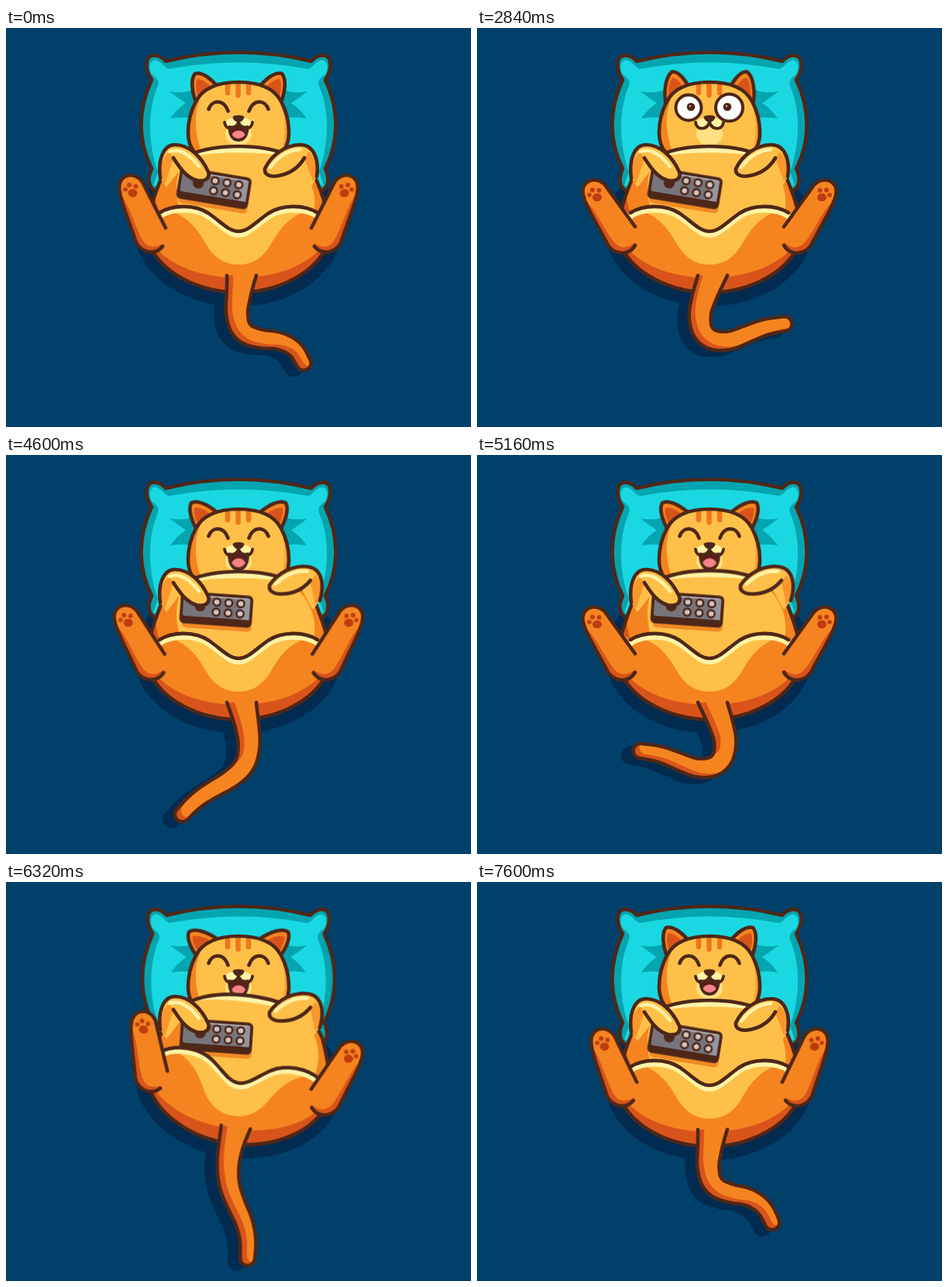
Write an HTML page that moves like this. It is 600x516 px and loops after 7.64 s.

```html
<!DOCTYPE html>
<html lang="en">
<head>
<meta charset="utf-8">
<title>Laughing cat</title>
<style>
  html, body { margin: 0; width: 100%; height: 100%; overflow: hidden; background: #00406a; }
  svg { display: block; width: 100%; height: 100%; }

  .line { fill: none; stroke: #4e2718; stroke-width: 4.6; stroke-linecap: round; stroke-linejoin: round; }
  .ink { fill: #4e2718; }
  .shadow { fill: #012b50; }
  .teal { fill: #04a5b0; }
  .aqua { fill: #1ad8e1; }
  .light { fill: #ffc04a; }
  .amber { fill: #f9972c; }
  .orange { fill: #f58420; }
  .rust { fill: #d9541a; }
  .cream { fill: #fff3a6; }
  .gloss { fill: none; stroke: #fff3a6; stroke-width: 4.5; stroke-linecap: round; }
  .pads { fill: #bf3c10; }

  .pillow, .body, .thighs, .belly, .leg, .ear, .remote, .lift, .rest, .raised, .awake, .happy, .laugh, .pupils {
    animation: 7640ms ease-in-out infinite;
  }
  .pillow { transform-origin: 300px 120px; animation-name: pillow; }
  .body { transform-origin: 300px 255px; animation-name: sway; }
  .thighs { transform-origin: 300px 255px; animation-name: thighs; }
  .belly { transform-origin: 300px 342px; animation-name: swell; }
  .leg { transform-origin: 195px 270px; }
  .leg.a { animation-name: kick-a; }
  .leg.b { animation-name: kick-b; }
  .ear { transform-origin: 257px 86px; animation-name: ear; }
  .remote { transform-origin: 245px 195px; animation-name: remote; }
  .lift { animation-name: lift; }
  .rest { transform-origin: 398px 185px; animation-name: rest; }
  .raised { transform-origin: 386px 190px; animation-name: raised; }
  .awake { transform-origin: 300px 103px; animation-name: awake; }
  .happy { animation-name: happy; animation-timing-function: step-end; }
  .laugh { transform-origin: 300px 126px; animation-name: laugh; }
  .pupils { animation-name: look; }

  @keyframes pillow {
    0%, 76%, 99%, 100% { transform: none; }
    81%, 93% { transform: scaleX(.988); }
  }
  @keyframes sway {
    0%, 77.5%, 99%, 100% { transform: translate(0, 0) rotate(0); }
    81.7%, 83.5% { transform: translate(1px, -3px) rotate(7.5deg); }
    88.8%, 91.5% { transform: translate(0, 0) rotate(-6deg); }
  }
  @keyframes thighs {
    0%, 77.5%, 99%, 100% { transform: translate(0, 0) rotate(0); }
    81.7%, 83.5% { transform: rotate(3deg); }
    88.8%, 91.5% { transform: translate(0, -3px) rotate(-1deg); }
  }
  @keyframes swell {
    0%, 51.5%, 98.5%, 100% { transform: none; }
    57%, 62%, 67%, 72%, 78%, 93% { transform: scaleY(1.02); }
    59.5%, 64.5%, 69.5%, 75% { transform: scaleY(1.01); }
  }
  @keyframes kick-a {
    0% { transform: rotate(9deg); }
    10.4%, 47.2%, 51.8% { transform: rotate(0); }
    56% { transform: rotate(-5deg); }
    61.5% { transform: rotate(4deg); }
    67.5%, 77.5% { transform: rotate(0); }
    72.5% { transform: rotate(-3deg); }
    81.7%, 83.5% { transform: rotate(15deg); }
    88.8%, 91.5% { transform: rotate(-16deg); }
    99%, 99.5% { transform: rotate(10deg); }
    100% { transform: rotate(9deg); }
  }
  @keyframes kick-b {
    0% { transform: rotate(9deg); }
    10.4%, 47.2%, 51.8% { transform: rotate(0); }
    56% { transform: rotate(-5deg); }
    61.5% { transform: rotate(4deg); }
    67.5%, 77.5% { transform: rotate(0); }
    72.5% { transform: rotate(-3deg); }
    81.7%, 83.5% { transform: rotate(9deg); }
    88.8%, 91.5% { transform: rotate(-6deg); }
    99%, 99.5% { transform: rotate(10deg); }
    100% { transform: rotate(9deg); }
  }
  @keyframes ear {
    0%, 4% { transform: none; }
    8%, 46.8% { transform: rotate(16deg); }
    50%, 53% { transform: none; }
    60%, 70% { transform: rotate(-11deg); }
    80%, 92% { transform: rotate(-19deg); }
    98.5%, 100% { transform: none; }
  }
  @keyframes remote {
    0%, 47.5% { transform: rotate(9.5deg); }
    51.8% { transform: translate(2px, 0) rotate(6.5deg); }
    58%, 92% { transform: translate(2px, -5px) rotate(4deg); }
    98.5%, 100% { transform: rotate(9.5deg); }
  }
  @keyframes lift {
    0%, 51.8% { transform: none; }
    58%, 92% { transform: translate(0, -3px); }
    98.5%, 100% { transform: none; }
  }
  @keyframes rest {
    0%, 47.5% { transform: none; opacity: 1; }
    49.8% { transform: rotate(22deg); opacity: 1; }
    49.81%, 53.79% { opacity: 0; transform: rotate(22deg); }
    53.8% { transform: rotate(20deg); opacity: 1; }
    55%, 68.5% { transform: translate(5px, -4px) rotate(9deg); opacity: 1; }
    69.6% { transform: rotate(22deg); opacity: 1; }
    69.61%, 72.99% { opacity: 0; transform: rotate(22deg); }
    73% { transform: rotate(20deg); opacity: 1; }
    74.2%, 87% { transform: translate(5px, -4px) rotate(9deg); opacity: 1; }
    88.7% { transform: rotate(22deg); opacity: 1; }
    88.71%, 92.79% { opacity: 0; transform: rotate(22deg); }
    92.8% { transform: rotate(20deg); opacity: 1; }
    95%, 97% { transform: translate(4px, -3px) rotate(7deg); opacity: 1; }
    99.4%, 100% { transform: none; opacity: 1; }
  }
  @keyframes raised {
    0%, 49.79% { opacity: 0; transform: rotate(-34deg); }
    49.8% { opacity: 1; transform: rotate(-34deg); }
    51.4%, 52.2% { opacity: 1; transform: none; }
    53.79% { opacity: 1; transform: rotate(-34deg); }
    53.8%, 69.59% { opacity: 0; transform: rotate(-34deg); }
    69.6% { opacity: 1; transform: rotate(-34deg); }
    71%, 71.6% { opacity: 1; transform: none; }
    72.99% { opacity: 1; transform: rotate(-34deg); }
    73%, 88.69% { opacity: 0; transform: rotate(-34deg); }
    88.7% { opacity: 1; transform: rotate(-34deg); }
    90.2%, 91.2% { opacity: 1; transform: translate(0, -5px) rotate(-3deg); }
    92.79% { opacity: 1; transform: rotate(-34deg); }
    92.8%, 100% { opacity: 0; transform: rotate(-34deg); }
  }
  @keyframes awake {
    0%, 6.27% { opacity: 0; transform: scaleY(.25); }
    6.28% { opacity: 1; transform: scaleY(.25); }
    8.4%, 27.5% { opacity: 1; transform: none; }
    28.5% { opacity: 1; transform: scaleY(.1); }
    30%, 47% { opacity: 1; transform: none; }
    47.9% { opacity: 1; transform: scaleY(.2); }
    47.91%, 100% { opacity: 0; transform: scaleY(.2); }
  }
  @keyframes happy {
    0% { opacity: 1; }
    6.28% { opacity: 0; }
    47.91% { opacity: 1; }
  }
  @keyframes laugh {
    0%, 51.8% { transform: none; }
    58%, 93% { transform: scale(1.04, 1.14); }
    98.5%, 100% { transform: none; }
  }
  @keyframes look {
    0%, 10.5%, 15.7%, 26.5%, 35%, 100% { transform: none; }
    12.5% { transform: translate(0, -1px); }
    31%, 33% { transform: translate(2px, 1px); }
  }
</style>
</head>
<body>
<svg viewBox="0 0 600 516">
  <defs>
    <clipPath id="tailClip"><path class="tailFill"/></clipPath>
    <path id="case" d="M206 43Q300 20 394 43C402 34 413 33 417 40C421 51 416 61 412 67C432 110 428 150 412 182C418 195 416 206 408 210H192C184 206 182 195 188 182C172 150 168 110 188 67C184 61 179 51 183 40C187 33 198 34 206 43Z"/>
    <path id="torso" d="M300 153C350 153 385 168 400 195C412 225 425 260 410 290C390 322 345 342 300 342C255 342 210 322 190 290C175 260 188 225 200 195C215 168 250 153 300 153Z"/>
    <clipPath id="torsoClip"><use href="#torso"/></clipPath>
    <path id="headShape" d="M300 70C275 70 255 76 245 95C237 110 235 122 235 135C235 150 240 158 248 166H352C360 158 365 150 365 135C365 122 363 110 355 95C345 76 325 70 300 70Z"/>
    <clipPath id="headClip"><use href="#headShape"/></clipPath>
    <path id="hipLine" d="M198 239C215 228 244 228 262 240C280 253 288 263 300 263C312 263 320 253 338 240C356 228 385 228 402 239"/>
    <path id="legShape" d="M204 257L168 207C160 192 138 193 136.500 210C136 218 141 228 147 240L166 275C173 293 195 297 204 281"/>
    <clipPath id="legClip"><use href="#legShape"/></clipPath>
    <g id="legArt">
      <use href="#legShape" class="orange"/>
      <path clip-path="url(#legClip)" class="rust" d="M134 218C152 230 162 258 177 277C185 286 194 286 206 276V300H150Z"/>
      <use href="#legShape" class="line"/>
      <g class="pads">
        <ellipse cx="155" cy="219" rx="6" ry="5.3"/>
        <circle cx="145" cy="216" r="2.8"/><circle cx="149" cy="209.500" r="3"/><circle cx="157.500" cy="210" r="2.9"/>
      </g>
    </g>
    <g id="earArt">
      <path class="orange" d="M249 104C239 86 238 66 244 59C253 56 265 66 274 77Z"/>
      <path class="rust" d="M250 96C244 82 244 69 247 66C254 66 262 73 267 79Z"/>
      <path class="line" d="M249 104C239 86 238 66 244 59C253 56 265 66 274 77"/>
    </g>
    <path id="crease" class="teal" d="M246 78Q230 86 211 82Q222 91 232 97Q220 105 212 117Q228 114 242 117Z"/>
  </defs>

  <g class="body">
    <ellipse class="shadow" cx="299" cy="259" rx="134" ry="101"/>
    <path class="shadow tailFill" stroke="#012b50" stroke-width="5" transform="translate(-13 6)"/>
  </g>

  <g class="pillow">
    <use href="#case" class="teal"/>
    <path class="aqua" d="M188 60C182 48 188 40 194 42C201 44 204 51 210 53Q300 36 390 53C396 51 399 44 406 42C412 40 418 48 412 60C400 68 403 72 406 80C418 112 416 152 404 186L410 204H190L196 186C184 152 182 112 194 80C197 72 200 68 188 60Z"/>
    <use href="#crease"/>
    <use href="#crease" transform="matrix(-1 0 0 1 600 0)"/>
    <use href="#case" class="line"/>
  </g>

  <g class="ear"><use href="#earArt"/></g>
  <g transform="matrix(-1 0 0 1 600 0)"><g class="ear"><use href="#earArt"/></g></g>
  <use href="#headShape" class="light"/>
  <g clip-path="url(#headClip)">
    <path class="orange" d="M262 70C243 96 238 128 256 170H225V70Z"/>
    <path class="orange" opacity=".55" d="M345 80C362 104 364 136 352 170H372V80Z"/>
    <path d="M286 68V84M299.500 66V87M313 68V84" stroke="#ef761d" stroke-width="6.500" stroke-linecap="round"/>
  </g>
  <use href="#headShape" class="line"/>

  <ellipse cx="300" cy="137" rx="17" ry="15" fill="#ffe183"/>
  <path class="cream" d="M284 121C286 114 314 114 316 121C316 131 304 131 300 124C296 131 284 131 284 121Z"/>
  <g class="happy">
    <g class="laugh">
      <path class="line" style="fill:#5c1d18;stroke-width:3.800" d="M288.500 128Q295 130 300 124Q305 130 311.500 128C311.500 139 307 145 300 145C293 145 288.500 139 288.500 128Z"/>
      <path fill="#f58488" d="M291.500 138C294 131 306 131 308.500 138C304 144.500 296 144.500 291.500 138Z"/>
    </g>
    <path class="line" d="M261.500 105C266 92 281 92 286.500 107.500M338.500 105C334 92 319 92 313.500 107.500"/>
  </g>
  <path class="line" style="stroke-width:3.800" d="M282 122C283 132 296 133 300 122C304 133 317 132 318 122"/>
  <path class="ink" d="M292.500 115C294 112 306 112 307.500 115C307 119 303 122 300 122C297 122 293 119 292.500 115Z"/>
  <g class="awake">
    <circle class="line" style="fill:#fff;stroke-width:4" cx="273" cy="103" r="16.500"/>
    <circle class="line" style="fill:#fff;stroke-width:4" cx="325.500" cy="103" r="17.500"/>
    <g class="pupils">
      <circle class="ink" cx="276" cy="102" r="5.300"/><circle class="ink" cx="323" cy="102" r="5.300"/>
      <circle cx="275" cy="101" r="1" fill="#fff"/><circle cx="322" cy="101" r="1" fill="#fff"/>
    </g>
  </g>

  <g class="raised">
    <path class="light" d="M365 180C367 150 375 125 392 116C405 109 418 110 422 114C425 120 415 127 410 137C404 150 402 165 401 196Z"/>
    <path class="gloss" d="M372 160C376 140 382 128 394 120"/>
    <path class="amber" d="M389 196C391 170 395 142 417 122C408 134 403 160 401 196Z"/>
    <path class="line" d="M365 180C367 150 375 125 392 116C405 109 418 110 422 114C425 120 415 127 410 137C404 150 402 165 401 196"/>
  </g>

  <g class="body">
    <g class="belly">
      <use href="#torso" class="orange"/>
      <g clip-path="url(#torsoClip)">
        <path class="rust" d="M180 230L196 178C190 206 192 222 198 240Z"/>
        <path class="light" d="M300 150C350 150 378 170 392 198C400 215 400 232 394 250L300 272L226 244C220 220 214 196 232 164C250 154 274 150 300 150Z"/>
        <path class="cream" d="M238 165C270 150 330 150 362 165C330 158 270 158 238 165Z" stroke="#fff3a6" stroke-width="3"/>
      </g>
      <use href="#torso" class="line"/>
    </g>
  </g>

  <g class="remote">
    <g transform="translate(270 203)">
      <rect x="-43" y="-12" width="90" height="38" rx="5" fill="#f08a25"/>
      <rect class="line" style="fill:#4e2718" x="-44.500" y="-18.500" width="89" height="37" rx="4"/>
      <rect x="-43" y="-17" width="86" height="28" rx="3" fill="#77747c"/>
      <path fill="#96949c" d="M26 -17H41L43 -15V11H34Z"/>
      <path d="M-40 -16H40" stroke="#aaa8ae" stroke-width="2"/>
      <circle cx="-21" cy="-3" r="7" class="ink"/>
      <g id="buttons" fill="#d3c5c4" stroke="#4e2718" stroke-width="2.600"></g>
    </g>
  </g>

  <g class="lift">
    <path class="light" d="M199 194C196 172 202 151 218 151C236 151 252 166 261 186C264 195 256 199 246 197C236 194 230 189 225 183L207 206Z"/>
    <path class="amber" d="M201 196C198 180 202 165 212 160Q214 168 216 169L205 202Z"/>
    <path class="gloss" d="M211 160C225 154 240 167 249 179"/>
    <path class="line" d="M199 194C196 172 202 151 218 151C236 151 252 166 261 186C264 195 256 199 246 197C232 193 224 180 216 168"/>
  </g>
  <g class="rest">
    <path class="light" d="M401 192C404 172 398 151 380 151C360 151 342 165 334 182C333 191 343 193 352 191C362 189 370 186 376 182L394 205Z"/>
    <path class="amber" d="M399 194C402 178 398 165 390 160Q388 166 385 169L396 198Z"/>
    <path class="gloss" d="M379 157C363 158 350 168 341 180"/>
    <path class="line" d="M401 192C404 172 398 151 380 151C360 151 342 165 334 182C333 191 343 193 352 191C368 188 378 180 385 168"/>
  </g>

  <g class="body">
    <g clip-path="url(#torsoClip)">
      <g class="thighs">
        <path class="orange" d="M180 258L198 239C215 228 244 228 262 240C280 253 288 263 300 263C312 263 320 253 338 240C356 228 385 228 402 239L420 258V350H180Z"/>
        <path class="light" d="M212 237C235 228 253 234 266 244C280 255 290 263 300 263C310 263 320 255 334 244C347 234 365 228 388 237C364 244 352 262 341 281C330 299 316 306 300 306C284 306 270 299 259 281C248 262 236 244 212 237Z"/>
      </g>
      <path class="rust" d="M186 274C205 306 250 323 300 323C350 323 395 306 414 274V345H186Z"/>
    </g>
    <path class="line" d="M410 290C390 322 345 342 300 342C255 342 210 322 190 290"/>
    <g class="thighs">
      <use href="#hipLine" class="gloss" style="stroke-width:7" transform="translate(0 4.500)"/>
      <use href="#hipLine" class="line"/>
    </g>
    <g class="leg a"><use href="#legArt"/></g>
    <g transform="matrix(-1 0 0 1 600 0)"><g class="leg b"><use href="#legArt"/></g></g>
    <g clip-path="url(#tailClip)">
      <path class="rust tailFill"/>
      <path class="orange tailFill" transform="translate(8 -5)"/>
    </g>
    <path class="line" id="tailLine"/>
  </g>
</svg>

<script>
  const LOOP = 7640;
  const KNOTS = 7, STEPS = 42;

  const buttons = document.getElementById('buttons');
  for (let i = 0; i < 6; i++) {
    const dot = document.createElementNS('http://www.w3.org/2000/svg', 'circle');
    dot.setAttribute('cx', i % 3 * 15.5);
    dot.setAttribute('cy', i < 3 ? -9.5 : 3.5);
    dot.setAttribute('r', 4.6);
    buttons.append(dot);
  }

  // A pose is the segment length, then seven headings in degrees (0 = down, 90 = right).
  const right = [27, -22, -15, 15, 80, 112, 112, 98];
  const left = right.map((v, i) => i ? -v : v);
  const flick = right.map((v, i) => i > 5 ? v + 7 : v);
  const start = [24, -9, -7, 15, 70, 88, 65, 28];
  const keys = [
    [0, start],
    [760, flick],
    [1200, right],
    [2000, right],
    [2400, flick],
    [2760, right],
    [3580, right],
    [3960, [25.3, -4, 5, 15, 34, 36, 20, 2]],
    [4300, [26, 4, 2, -2, -4, -2, 0, 0]],
    [4960, left],
    [5160, left],
    [5900, [27, 22, 15, -15, -78, -108, -105, -85]],
    [6320, [25, -8, 0, 12, 28, 33, 20, 4]],
    [6920, [25, 6, 4, -4, -15, -22, -18, -6]],
    [7600, [24, -9, -6, 15, 68, 82, 56, 25]]
  ];

  function keyAt(i) {
    const n = keys.length, turn = Math.floor(i / n);
    const [t, pose] = keys[i - turn * n];
    return [t + turn * LOOP, pose];
  }

  // Smooth through keys, with no overshoot at turning points.
  function poseAt(t) {
    let i = keys.length - 1;
    while (keys[i][0] > t) i--;
    const k = [-1, 0, 1, 2].map(d => keyAt(i + d));
    const span = k[2][0] - k[1][0], u = (t - k[1][0]) / span;
    const slope = (a, c) => (k[a + 1][1][c] - k[a][1][c]) / (k[a + 1][0] - k[a][0]);
    const blend = (p, q) => p * q <= 0 ? 0 : 2 * p * q / (p + q);
    return k[1][1].map((from, c) => {
      const to = k[2][1][c], mid = slope(1, c);
      const m0 = blend(slope(0, c), mid) * span, m1 = blend(mid, slope(2, c)) * span;
      const u2 = u * u, u3 = u2 * u;
      return from * (2 * u3 - 3 * u2 + 1) + m0 * (u3 - 2 * u2 + u) + to * (3 * u2 - 2 * u3) + m1 * (u3 - u2);
    });
  }

  const point = (x, y) => x.toFixed(2) + ' ' + y.toFixed(2);

  function tailPath([len, ...angles]) {
    const step = len * KNOTS / STEPS, a = [], b = [];
    let x = 304, y = 320, half;
    for (let i = 0; i <= STEPS; i++) {
      const s = i / STEPS;
      const pos = Math.min(KNOTS - 1, Math.max(0, s * KNOTS - 0.5));
      const j = Math.min(KNOTS - 2, Math.floor(pos));
      const heading = (angles[j] + (angles[j + 1] - angles[j]) * (pos - j)) * Math.PI / 180;
      const side = heading * Math.min(1, s * 6);
      half = 9.5 + 6 * (1 - s) + 3.5 * Math.exp(-8 * s);
      const nx = Math.cos(side) * half, ny = Math.sin(side) * half;
      a.push(point(x - nx, y + ny));
      b.unshift(point(x + nx, y - ny));
      x += Math.sin(heading) * step;
      y += Math.cos(heading) * step;
    }
    const r = half.toFixed(2);
    return `M${a.join('L')}A${r} ${r} 0 0 0 ${b.join('L')}`;
  }

  const fills = document.querySelectorAll('.tailFill');
  const outline = document.getElementById('tailLine');

  function draw(now) {
    const d = tailPath(poseAt(Math.max(0, now) % LOOP));
    fills.forEach(p => p.setAttribute('d', d));
    outline.setAttribute('d', d);
    requestAnimationFrame(draw);
  }

  // Put the CSS animations on the same clock as the tail.
  document.getAnimations().forEach(a => { a.startTime = 0; });
  draw(performance.now());
</script>
</body>
</html>
```
